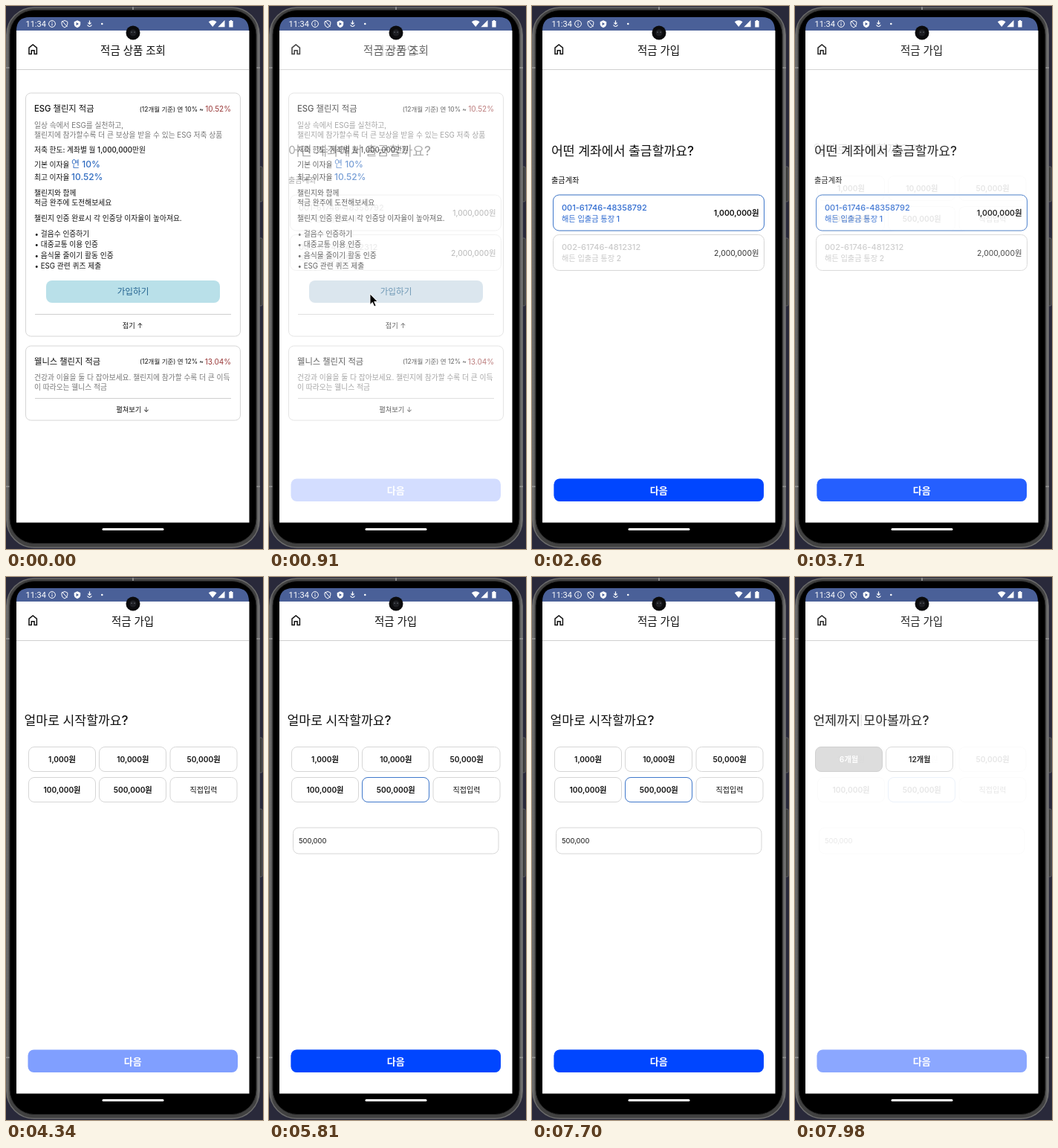
These frames come from a looping animation (346x730 px, 8 s). An HTML page:

```html
<!DOCTYPE html>
<html lang="ko">
<head>
<meta charset="utf-8">
<title>적금 가입</title>
<style>
html, body { margin: 0; width: 100%; height: 100%; overflow: hidden; background: #29293a; }
svg { display: block; width: 100vw; height: 100vh; }
text { font-family: Inter, "Noto Sans CJK KR", "Noto Sans CJK", sans-serif; font-size: 9.75px; fill: #111; white-space: pre; }
.mid { text-anchor: middle; }
.end { text-anchor: end; }
.semi { font-weight: 500; }
.bold { font-weight: 600; }
.title { font-size: 14.5px; font-weight: 500; text-anchor: middle; }
.ask { font-size: 17.2px; font-weight: 500; }
.name { font-size: 11.3px; font-weight: 500; }
.rate { font-size: 8.5px; }
.top { font-size: 10px; fill: #983636; text-anchor: end; }
.gray { fill: #777; }
.pct { font-size: 12px; font-weight: 500; fill: #2f6bc0; }
.fold { font-size: 9.3px; text-anchor: middle; }
.box { fill: #fff; stroke: #d6d6d6; }
.on { stroke: #3f78cc; }
.line { stroke: #cfcfcf; }
.acct { font-size: 11px; font-weight: 500; fill: #cacaca; }
.bank { font-size: 10.2px; font-weight: 500; fill: #cacaca; }
.blue { fill: #2f6bd0; }
.sum { font-size: 10.4px; fill: #333; text-anchor: end; }
.won { font-size: 10.2px; font-weight: 600; text-anchor: middle; }
.next { font-size: 13px; font-weight: 600; fill: #fff; text-anchor: middle; }
.off { fill: #809fff; }
.go { fill: #0046ff; }
.clock { font: 11px Roboto, sans-serif; fill: #fff; }

/* Every state change lands on a 70 ms step */
.t { animation: 8s step-end infinite; }
#list { animation-name: list; }
#account { animation-name: account; }
#amount { animation-name: amount; }
#term { animation-name: term; }
#join { animation-name: join; }
#cursor { animation-name: cursor; }
#pick { animation-name: pick; }
#sum { animation-name: sum; }
@keyframes list {
  0% { opacity: 1 } 10.5% { opacity: .896 } 11.375% { opacity: .648 }
  12.25% { opacity: .352 } 13.125% { opacity: .104 } 14%, 100% { opacity: 0 }
}
@keyframes account {
  0% { opacity: 0 } 10.5% { opacity: .104 } 11.375% { opacity: .352 }
  12.25% { opacity: .648 } 13.125% { opacity: .896 } 14% { opacity: 1 }
  46.375% { opacity: .896 } 47.25% { opacity: .648 } 48.125% { opacity: .352 }
  49% { opacity: .104 } 49.875%, 100% { opacity: 0 }
}
@keyframes amount {
  0% { opacity: 0 } 46.375% { opacity: .104 } 47.25% { opacity: .352 }
  48.125% { opacity: .648 } 49% { opacity: .896 } 49.875% { opacity: 1 }
  97.125% { opacity: .896 } 98% { opacity: .648 } 98.875% { opacity: .352 }
  99.75%, 100% { opacity: .104 }
}
@keyframes term {
  0% { opacity: 0 } 97.125% { opacity: .104 } 98% { opacity: .352 }
  98.875% { opacity: .648 } 99.75%, 100% { opacity: .896 }
}
@keyframes join { 0% { fill: #b9e0e9 } 7.875%, 100% { fill: #c9d9e5 } }
@keyframes cursor { 0% { opacity: 0 } 7.875% { opacity: 1 } 17.5%, 100% { opacity: 0 } }
@keyframes pick { 0% { opacity: 0 } 33.25%, 100% { opacity: 1 } }
@keyframes sum { 0% { opacity: 0 } 72.625%, 100% { opacity: 1 } }
</style>
</head>
<body>
<svg viewBox="0 0 346 730">
  <defs>
    <linearGradient id="metal">
      <stop offset="0" stop-color="#777"/><stop offset=".015" stop-color="#414141"/>
      <stop offset=".985" stop-color="#414141"/><stop offset="1" stop-color="#808080"/>
    </linearGradient>
    <g id="head">
      <path d="M31 56.2 36.2 52l5.2 4.2v8.3h-3.3v-4.7h-3.8v4.7H31z" fill="none" stroke="#111" stroke-width="1.5"/>
      <path class="line" d="M14 85.5h313"/>
    </g>
    <rect id="bar" x="29.5" y="635.5" width="282.5" height="30.5" rx="8"/>
    <rect id="acctBox" x="28.5" y="254" width="284" height="48" rx="8"/>
    <rect id="cell" width="90" height="33" rx="7.5"/>
  </defs>

  <!-- Phone -->
  <rect x="341" y="216" width="4" height="47" rx="1.5" fill="#3a3a3a" stroke="#777" stroke-width=".7"/>
  <rect x="341" y="312" width="4" height="91" rx="1.5" fill="#3a3a3a" stroke="#777" stroke-width=".7"/>
  <rect x=".8" y="2" width="340.4" height="726" rx="37" fill="url(#metal)" stroke="#6c6c6c" stroke-width="1.4"/>
  <path d="M0 83h5M337 83h5M171 1v5M0 646h5M337 646h5" stroke="#8a8a8a" stroke-width="2"/>
  <rect x="5" y="5.5" width="332" height="717" rx="33" stroke="#292929"/>
  <path d="M14 33.5V33q0-18 18-18H310q17 0 17 18v.5z" fill="#4a6098"/>
  <rect x="14" y="33" width="313.5" height="661.5" fill="#fff"/>
  <rect x="129.5" y="702" width="83" height="3" rx="1.5" fill="#fff"/>

  <!-- Status bar -->
  <text class="clock" x="26.5" y="28">11:34</text>
  <g fill="none" stroke="#fff">
    <circle cx="62" cy="24" r="4.4"/>
    <path d="M62 23.4v3M62 21.3v1.1"/>
    <path d="M75 21.2 79 19.5l3.8 1.7v3q0 3-3.8 4.8-4-1.8-4-4.8zM75.5 20l7 8"/>
    <path d="M112.5 19.5v5M110.5 22.5l2 2 2-2M109.5 25.5q3 4 6 0" stroke-width="1.2"/>
  </g>
  <path d="M91.7 21.2 96 19.2l4.2 2v3q0 3.3-4.2 5.1-4.3-1.8-4.3-5.1z" fill="#fff"/>
  <path d="M94.6 22v4.2l3.4-2.1z" fill="#4a6098"/>
  <circle cx="129.3" cy="24" r="1.3" fill="#fff"/>
  <path d="M272.8 21.3q5.4-4.2 10.8 0L278.2 28zM294.5 19v9.2h-9.2zM300.3 20h1.5v-1h2.2v1h1.6v8.5h-5.3z" fill="#fff"/>

  <!-- Product list -->
  <g id="list" class="t">
    <use href="#head"/>
    <text class="title" x="171" y="65">적금 상품 조회</text>
    <rect class="box" x="26.5" y="117" width="289" height="327" rx="7"/>
    <text class="name" x="38" y="142">ESG 챌린지 적금</text>
    <text class="rate end" x="266" y="141.5">(12개월 기준) 연 10% ~</text>
    <text class="top" x="303" y="142">10.52%</text>
    <text class="gray" x="38" y="163.5">일상 속에서 ESG를 실천하고,</text>
    <text class="gray" x="38" y="176.5">챌린지에 참가할수록 더 큰 보상을 받을 수 있는 ESG 저축 상품</text>
    <text class="semi" x="38" y="197">저축 한도: 계좌별 월 1,000,000만원</text>
    <text class="semi" x="38" y="216.5">기본 이자율</text>
    <text class="pct" x="88" y="217">연 10%</text>
    <text class="semi" x="38" y="233.5">최고 이자율</text>
    <text class="pct" x="88" y="234">10.52%</text>
    <text x="38" y="255">챌린지와 함께</text>
    <text x="38" y="268">적금 완주에 도전해보세요</text>
    <text x="38" y="288.5">챌린지 인증 완료시 각 인증당 이자율이 높아져요.</text>
    <text x="38.5" y="309.5">• 걸음수 인증하기</text>
    <text x="38.5" y="324">• 대중교통 이용 인증</text>
    <text x="38.5" y="338.5">• 음식물 줄이기 활동 인증</text>
    <text x="38.5" y="353">• ESG 관련 퀴즈 제출</text>
    <rect id="join" class="t" x="54" y="369" width="234" height="30" rx="8"/>
    <text class="mid semi" x="171" y="388" style="font-size:11.6px;fill:#22628f">가입하기</text>
    <path class="line" d="M39 414.5h264"/>
    <text class="fold" x="170.5" y="433">접기 ↑</text>

    <rect class="box" x="26.5" y="457" width="289" height="100" rx="7"/>
    <text class="name" x="38" y="482">웰니스 챌린지 적금</text>
    <text class="rate end" x="266" y="481">(12개월 기준) 연 12% ~</text>
    <text class="top" x="303" y="481.5">13.04%</text>
    <text class="gray" x="38" y="502.5">건강과 이율을 둘 다 잡아보세요. 챌린지에 참가할 수록 더 큰 이득</text>
    <text class="gray" x="38" y="515.5">이 따라오는 웰니스 적금</text>
    <path class="line" d="M39 527.5h264"/>
    <text class="fold" x="170.5" y="546">펼쳐보기 ↓</text>
  </g>

  <!-- Account choice -->
  <g id="account" class="t">
    <use href="#head"/>
    <text class="title" x="170.5" y="65">적금 가입</text>
    <text class="ask" x="26" y="200.5">어떤 계좌에서 출금할까요?</text>
    <text class="semi" x="26" y="238" style="font-size:10.2px">출금계좌</text>
    <use class="box" href="#acctBox" fill-opacity="0"/>
    <text class="acct" x="40" y="274.5">001-61746-48358792</text>
    <text class="bank" x="40" y="289.5">해든 입출금 통장 1</text>
    <text class="sum" x="305.5" y="282">1,000,000원</text>
    <use class="box" href="#acctBox" y="53.5" fill-opacity="0"/>
    <text class="acct" x="40" y="328">002-61746-4812312</text>
    <text class="bank" x="40" y="343">해든 입출금 통장 2</text>
    <text class="sum" x="305.5" y="335.5">2,000,000원</text>
    <use class="off" href="#bar"/>
    <g id="pick" class="t">
      <use class="box on" href="#acctBox"/>
      <text class="acct blue" x="40" y="274.5">001-61746-48358792</text>
      <text class="bank blue" x="40" y="289.5">해든 입출금 통장 1</text>
      <text class="sum bold" x="305.5" y="282" style="fill:#111">1,000,000원</text>
      <use class="go" href="#bar"/>
    </g>
    <text class="next" x="170.7" y="656">다음</text>
  </g>

  <!-- Amount choice -->
  <g id="amount" class="t">
    <use href="#head"/>
    <text class="title" x="170.5" y="65">적금 가입</text>
    <text class="ask" x="24.5" y="199">얼마로 시작할까요?</text>
    <g class="box" fill-opacity="0">
      <use href="#cell" x="30.5" y="228.5"/><use href="#cell" x="125.5" y="228.5"/><use href="#cell" x="221" y="228.5"/>
      <use href="#cell" x="30.5" y="269.5"/><use href="#cell" x="125.5" y="269.5"/><use href="#cell" x="221" y="269.5"/>
    </g>
    <use class="off" href="#bar"/>
    <g id="sum" class="t">
      <use class="box on" href="#cell" x="125.5" y="269.5"/>
      <rect class="box" x="32.5" y="337" width="276.5" height="35" rx="7.5"/>
      <text x="40" y="358" style="font-size:9.4px">500,000</text>
      <use class="go" href="#bar"/>
    </g>
    <text class="won" x="75.5" y="249">1,000원</text>
    <text class="won" x="170.8" y="249">10,000원</text>
    <text class="won" x="266" y="249">50,000원</text>
    <text class="won" x="75.5" y="290">100,000원</text>
    <text class="won" x="170.8" y="290">500,000원</text>
    <text class="mid semi" x="266" y="290" style="font-size:10px">직접입력</text>
    <text class="next" x="170.7" y="656">다음</text>
  </g>

  <!-- Term choice -->
  <g id="term" class="t">
    <use href="#head"/>
    <text class="title" x="170.5" y="65">적금 가입</text>
    <text class="ask" x="24.5" y="199">언제까지 모아볼까요?</text>
    <use href="#cell" x="27.5" y="228.5" fill="#d9d9d9" stroke="#cbcbcb"/>
    <use class="box" href="#cell" x="122.5" y="228.5"/>
    <text class="won" x="72.5" y="249" style="fill:#fff">6개월</text>
    <text class="won" x="167.8" y="249">12개월</text>
    <use class="off" href="#bar"/>
    <text class="next" x="170.7" y="656">다음</text>
  </g>

  <circle cx="171" cy="36" r="9.5" fill="#0b0b0d"/>
  <circle cx="171" cy="36" r="4.5" fill="#1d1e22"/>
  <path d="M168.3 35.2h1.6M172.2 35.2h1.6" stroke="#55585f" stroke-width="1.4"/>
  <path id="cursor" class="t" d="M136 387v14.5l3.3-3.1 2.4 5.6 2.4-1-2.4-5.5h4.5z" stroke="#fff" stroke-width=".9"/>
</svg>
</body>
</html>
```
